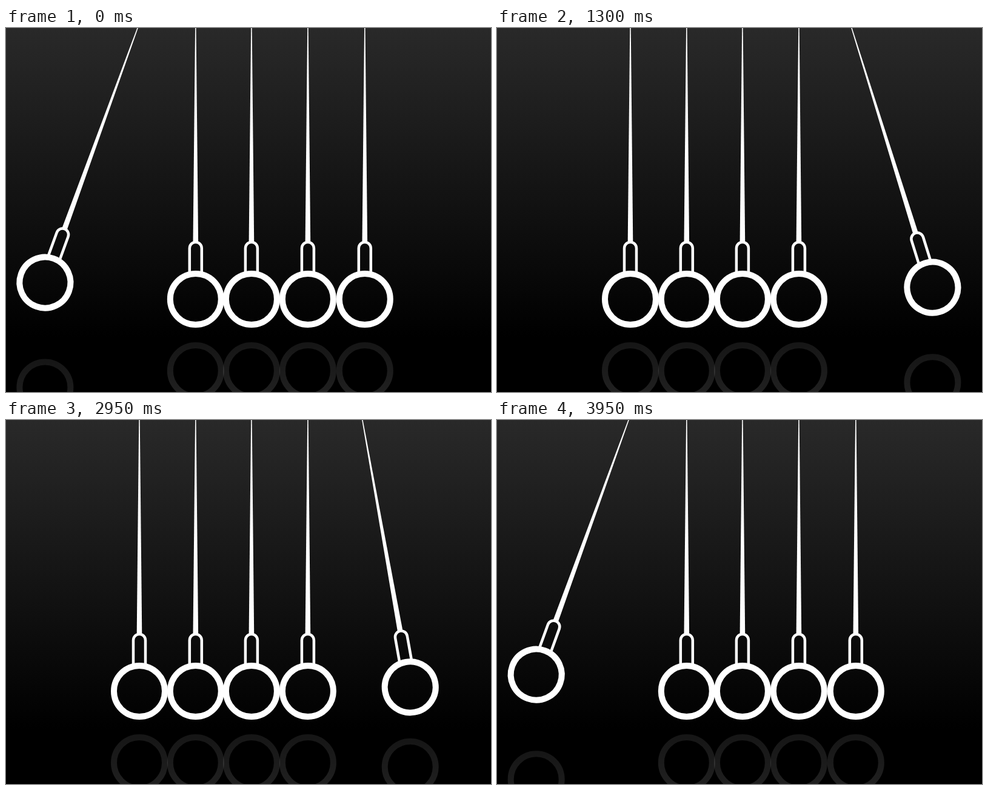
An HTML page that plays this animation: 800 by 600 pixels, repeating every 4000 ms.

```html
<!DOCTYPE html>
<html lang="en">
<head>
<meta charset="utf-8">
<title>Pendulum cradle</title>
<style>
  html, body { margin: 0; width: 100%; height: 100%; overflow: hidden; background: #000; }
  svg { display: block; width: 100vw; height: 100vh; }
</style>
</head>
<body>
<svg viewBox="0 0 800 600">
  <defs>
    <linearGradient id="backdrop" gradientUnits="userSpaceOnUse" x1="0" y1="0" x2="0" y2="510">
      <stop offset="0" stop-color="#292929"/>
      <stop offset="1" stop-color="#000"/>
    </linearGradient>
    <linearGradient id="sheen" gradientUnits="userSpaceOnUse" x1="0" y1="-47" x2="0" y2="47">
      <stop offset="0" stop-color="#fff" stop-opacity=".085"/>
      <stop offset="1" stop-color="#fff" stop-opacity=".13"/>
    </linearGradient>
    <g id="pendulum">
      <path d="M-.6 -14H.6L4.3 353H-4.3Z" fill="#fff"/>
      <g fill="none" stroke="#fff">
        <path d="M-10 404V363a10 10 0 0 1 20 0V404" stroke-width="4.5"/>
        <circle cy="447" r="42" stroke-width="10"/>
      </g>
    </g>
    <circle id="reflection" r="42" fill="none" stroke="url(#sheen)" stroke-width="10"/>
  </defs>
  <rect width="800" height="600" fill="url(#backdrop)"/>
  <g id="stage"></g>
</svg>
<script>
const LOOP = 4000, STEP = 50, SWING = 20;
const BALL_Y = 447, MIRROR_Y = 506;
const stage = document.getElementById('stage');

function addUse(id) {
  const node = document.createElementNS('http://www.w3.org/2000/svg', 'use');
  node.setAttribute('href', '#' + id);
  return stage.appendChild(node);
}

const balls = [220, 312.8, 404.9, 497.9, 591.8].map((x, i) => ({
  x,
  pivotY: i === 4 ? 22 : -8,
  reflection: addUse('reflection'),
  body: addUse('pendulum')
}));

const bezier = (a, b, s) => 3 * (1 - s) ** 2 * s * a + 3 * (1 - s) * s * s * b + s ** 3;

// Slow departure from the peak, very fast arrival at the impact.
function fall(t) {
  let low = 0, high = 1;
  for (let i = 0; i < 30; i++) {
    const mid = (low + high) / 2;
    if (bezier(.75, 1, mid) < t) low = mid; else high = mid;
  }
  return bezier(.03, .15, high);
}

function pose(ball, degrees) {
  const angle = degrees * Math.PI / 180;
  const length = BALL_Y - ball.pivotY;
  const x = ball.x - length * Math.sin(angle);
  const y = ball.pivotY + length * Math.cos(angle);
  ball.body.setAttribute('transform',
    `translate(${ball.x} 0) rotate(${degrees} 0 ${ball.pivotY})`);
  ball.reflection.setAttribute('transform', `translate(${x} ${2 * MIRROR_Y - y})`);
}

function draw(ms) {
  const t = Math.floor(ms % LOOP / STEP) * STEP / 1000;
  const onRight = t >= 1 && t < 3;
  const fromPeak = onRight ? Math.abs(t - 2) : Math.min(t, 4 - t);
  const angle = fromPeak >= 1 ? 0 : SWING * (1 - fall(fromPeak));
  pose(balls[0], onRight ? 0 : angle);
  pose(balls[4], onRight ? -angle : 0);
}

balls.forEach(ball => pose(ball, 0));
draw(0);

let start;
requestAnimationFrame(function tick(now) {
  start ??= now;
  draw(now - start);
  requestAnimationFrame(tick);
});
</script>
</body>
</html>
```
